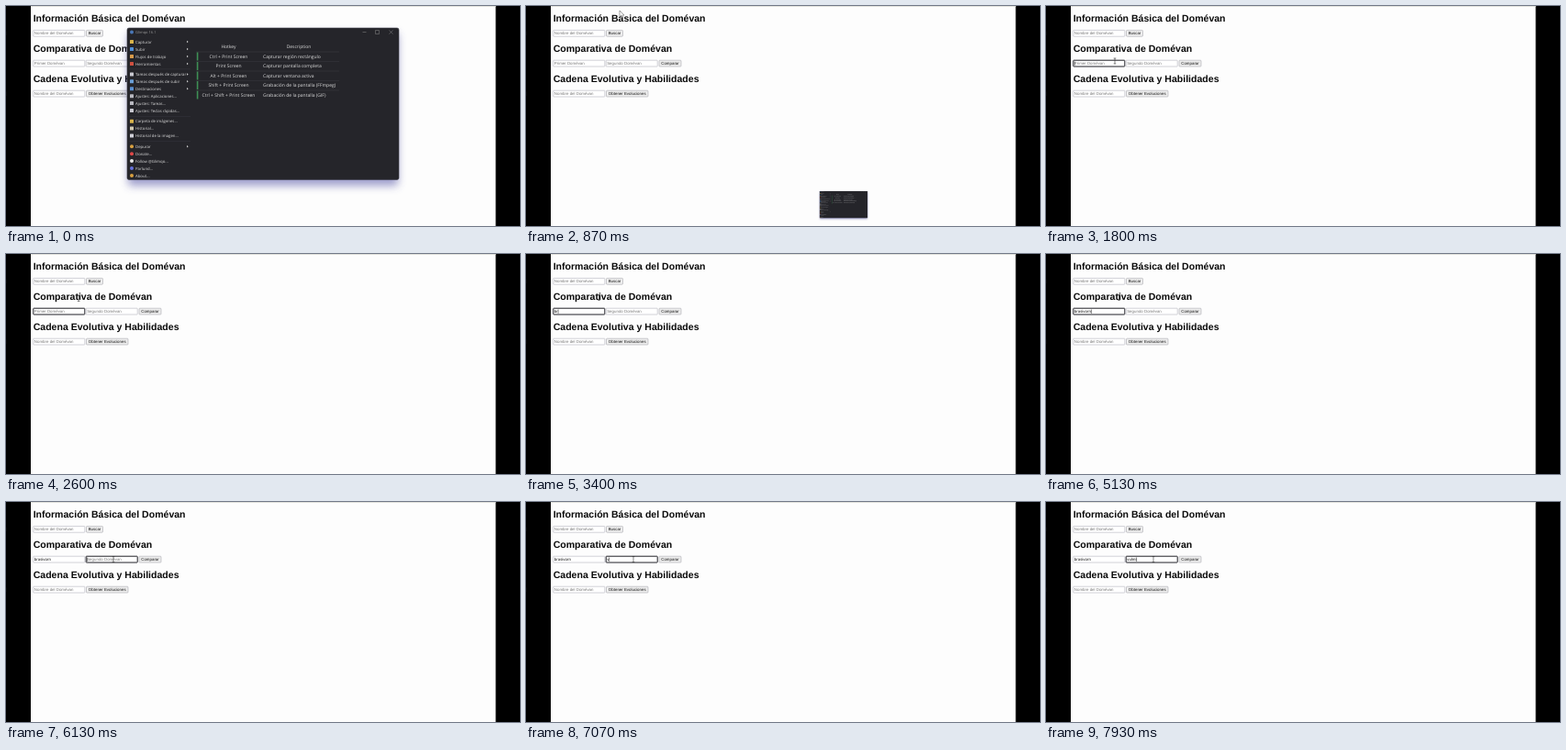
An HTML page that plays this animation: 560x240 px, repeating every 8 s.

```html
<!DOCTYPE html>
<html lang="es">
<head>
<meta charset="utf-8">
<style>
  html, body { margin: 0; width: 100%; height: 100%; overflow: hidden; background: #000; }
  svg { display: block; width: 560px; height: 240px; }
  text { font-family: "Liberation Sans", Arial, sans-serif; font-size: 4.4px; text-rendering: geometricPrecision; }
  .heading { font-size: 10.55px; font-weight: bold; fill: #0b0b0b; }
  .hint { fill: #777; }
  .value, .label { fill: #111; }
  .field { fill: #fff; stroke: #b2b2bd; stroke-width: .6; }
  .field.focus { stroke: #15151c; stroke-width: .95; }
  .button { fill: #ededed; stroke: #9a9aa2; stroke-width: .5; }
  .window text { font-family: "Open Sans", "Noto Sans", sans-serif; font-size: 5px; fill: #dcdcdc; }
  .window .menu { font-size: 4.3px; }
  .window .dim { font-size: 4px; fill: #999; }
  .mid { text-anchor: middle; }
</style>
</head>
<body>
<svg viewBox="0 0 560 240">
  <defs>
    <filter id="blur" x="-20%" y="-20%" width="140%" height="150%"><feGaussianBlur stdDeviation="5"/></filter>
  </defs>
  <rect x="27" width="506.5" height="240" fill="#fdfdfd"/>
  <rect x="27" width="506.5" height=".8" fill="#deded8"/>
  <g id="page"></g>
  <g id="window" class="window">
    <rect x="133" y="30" width="294" height="166" rx="3" fill="#3a3a98" opacity=".5" filter="url(#blur)"/>
    <rect x="132" y="24" width="296" height="165.5" rx="2" fill="#25252a" stroke="#3a3a46" stroke-width=".6"/>
    <path d="M388.5 28.5h4M402.500 26.500h4v4h-4zM417.500 26.500l4 4m0-4l-4 4" fill="none" stroke="#8a8a8a" stroke-width=".5"/>
  </g>
  <path id="arrow" d="M0 0V7L1.700 5.500L2.800 8L3.900 7.500L2.800 5.100H5Z" fill="#fff" stroke="#444" stroke-width=".5"/>
  <path id="beam" d="M-1.300-3H1.300M0-3V3M-1.300 3H1.300" fill="none" stroke="#333" stroke-width=".6"/>
</svg>
<script>
const $ = id => document.getElementById(id);

function add(parent, tag, attrs, content = "") {
  const node = document.createElementNS("http://www.w3.org/2000/svg", tag);
  for (const name in attrs) node.setAttribute(name, attrs[name]);
  node.textContent = content;
  return parent.appendChild(node);
}
const label = (parent, x, y, content, cls) => add(parent, "text", { x, y, class: cls }, content);

// Web form
const page = $("page"), win = $("window");

function field(x, y, hint) {
  const box = add(page, "rect", { x, y, width: 56, height: 6.8, rx: .5, class: "field" });
  const text = label(page, x + 1, y + 5, hint, "hint");
  const caret = add(page, "rect", { y: y + 1.3, width: .5, height: 4.4, fill: "#111" });
  return { x, box, text, caret, hint };
}
function button(x, y, width, content) {
  add(page, "rect", { x, y, width, height: 6.8, rx: .8, class: "button" });
  label(page, x + width / 2, y + 5, content, "label mid");
}

["Información Básica del Domévan", "Comparativa de Domévan", "Cadena Evolutiva y Habilidades"]
  .forEach((title, i) => label(page, 29.7, 16.9 + 32.9 * i, title, "heading"));
const rows = [26.4, 59.2, 92.2];
field(29.8, rows[0], "Nombre del Domévan");
button(87.5, rows[0], 18, "Buscar");
const first = field(29.8, rows[1], "Primer Domévan");
const second = field(87.2, rows[1], "Segundo Domévan");
button(145, rows[1], 24, "Comparar");
field(29.8, rows[2], "Nombre del Domévan");
button(87.5, rows[2], 45.5, "Obtener Evoluciones");
for (const input of [first, second]) page.append(input.box, input.text, input.caret);

// Capture tool window
function icon(y, color, round) {
  add(win, "rect", { x: 135, y: y - 2, width: 4, height: 4, rx: round ? 2 : .5, fill: color });
}
icon(28.5, "#4a78b8", true);
label(win, 141, 30, "Glimqo 16.1", "dim");

const menu = [
  [39, "Capturar", "#d8b34a", 1], [47, "Subir", "#4f8fd8", 1],
  [55, "Flujos de trabajo", "#d89a4a", 1], [63, "Herramientas", "#d05040", 1],
  [74.5, "Tareas después de capturar", "#c8c8d0", 1], [82.3, "Tareas después de subir", "#6a9fd8", 1],
  [90.2, "Destinaciones", "#5a8fd0", 1], [98.2, "Ajustes: Aplicaciones...", "#b8b8c0"],
  [106, "Ajustes: Tareas...", "#b8b8c0"], [114, "Ajustes: Teclas rápidas...", "#c8c8d0"],
  [125.7, "Carpeta de imágenes...", "#d8b34a"], [133.6, "Historial...", "#d0c8b0"],
  [141.6, "Historial de la imagen...", "#d0d0d8"], [153.3, "Depurar", "#d8a040", 1],
  [161.2, "Donate...", "#e04848"], [169, "Follow @Glimqo...", "#e8e8e8"],
  [177, "Parlund...", "#6672dd"], [185, "About...", "#d8a040"]
];
for (const [y, name, color, hasSubmenu] of menu) {
  icon(y, color, y > 150);
  label(win, 141, y + 1.6, name, "menu");
  if (hasSubmenu) add(win, "path", { d: `M197 ${y - 1.3}l1.700 1.300l-1.700 1.300z`, fill: "#ccc" });
}
for (const y of [68.7, 120, 147.5]) add(win, "rect", { x: 134, y, width: 67, height: .4, fill: "#3c3c44" });

label(win, 242.5, 46, "Hotkey", "mid");
label(win, 319, 46, "Description", "mid");
const hotkeys = [
  ["Ctrl + Print Screen", "Capturar región rectángulo"],
  ["Print Screen", "Capturar pantalla completa"],
  ["Alt + Print Screen", "Capturar ventana activa"],
  ["Shift + Print Screen", "Grabación de la pantalla (FFmpeg)"],
  ["Ctrl + Shift + Print Screen", "Grabación de la pantalla (GIF)"]
];
hotkeys.forEach(([keys, action], i) => {
  const y = 55 + 10.5 * i;
  add(win, "rect", { x: 207, y: y - 5.2, width: 156, height: .4, fill: "#404048" });
  add(win, "rect", { x: 207.8, y: y - 4.5, width: 1.6, height: 9, fill: "#3f8f55" });
  label(win, 242.5, y + 1.8, keys, "mid");
  label(win, 280, y + 1.8, action);
});

// Motion
const clamp = (v, lo = 0, hi = 1) => Math.min(hi, Math.max(lo, v));
const mix = (a, b, p) => a + (b - a) * p;
const smooth = p => p * p * (3 - 2 * p);

const pointerPath = [
  [600, 391, 28], [866, 102, 5], [1000, 102, 6], [1600, 75, 60],
  [2100, 75, 60], [2700, 79.5, 47.5], [5200, 79.5, 47.5], [5800, 117, 62.5], [8000, 117, 62.5]
];
function pointerAt(t) {
  const i = clamp(pointerPath.findIndex(key => key[0] > t), 1, pointerPath.length - 1);
  const [t0, x0, y0] = pointerPath[i - 1], [t1, x1, y1] = pointerPath[i];
  const p = smooth(clamp((t - t0) / (t1 - t0)));
  return [mix(x0, x1, p), mix(y0, y1, p)];
}
const show = (node, visible) => node.setAttribute("visibility", visible ? "visible" : "hidden");

function drawInput(input, t, word, start, step, focusFrom, focusTo) {
  const count = clamp(Math.floor((t - start) / step) + 1, 0, word.length);
  const focused = t >= focusFrom && t < focusTo;
  input.text.textContent = count ? word.slice(0, count) : input.hint;
  input.text.setAttribute("class", count ? "value" : "hint");
  input.box.classList.toggle("focus", focused);
  const width = count ? input.text.getComputedTextLength() : 0;
  input.caret.setAttribute("x", input.x + 1.1 + width);
  const lastKey = count ? start + (count - 1) * step : focusFrom;
  show(input.caret, focused && (t - lastKey) % 1060 < 530);
}

function draw(t) {
  const p = clamp((t - 600) / 266), shrink = 1 - (1 - p) ** 2;
  const x = mix(280, 346, shrink), y = mix(106.7, 216.6, shrink), scale = mix(1, .176, shrink);
  win.setAttribute("transform", `translate(${x} ${y}) scale(${scale}) translate(-280 -106.700)`);
  show(win, t < 930);

  drawInput(first, t, "brasivorn", 3130, 200, 1660, 5900);
  drawInput(second, t, "vulmi", 6930, 230, 5900, 8000);

  const place = `translate(${pointerAt(t).join(" ")})`, overText = t >= 1200;
  for (const id of ["arrow", "beam"]) $(id).setAttribute("transform", place);
  show($("arrow"), t >= 600 && !overText);
  show($("beam"), overText);
}

const tick = 1000 / 15;
function frame() {
  const t = performance.now() % 8000;
  draw(Math.floor((t + 5) / tick) * tick % 8000);
  requestAnimationFrame(frame);
}
frame();
</script>
</body>
</html>
```
